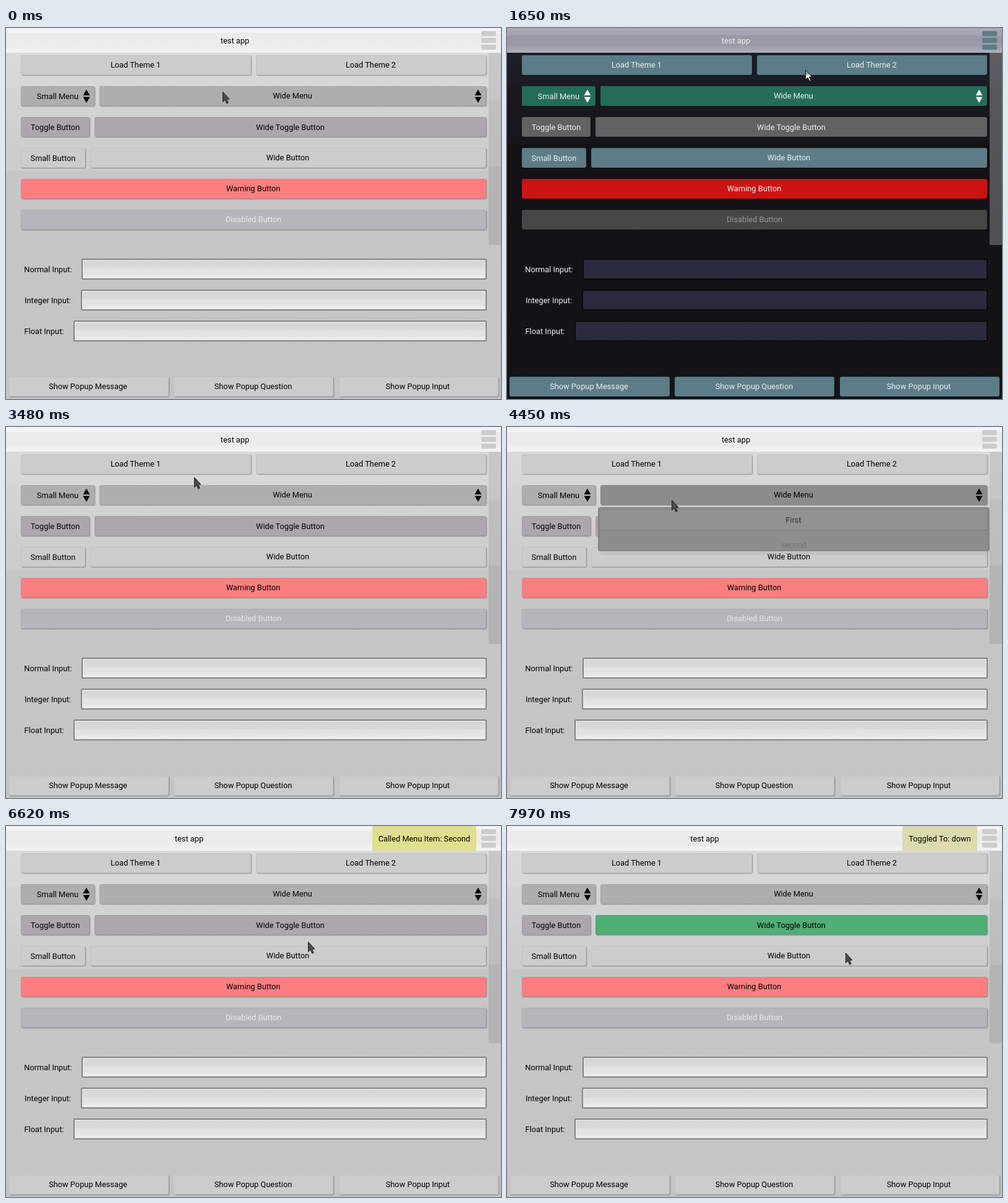
Recreate the animation shown at these times as an HTML page. Size 800 px wide and 600 px high, loop 8 s.

```html
<!DOCTYPE html>
<html lang="en">
<head>
<meta charset="utf-8">
<title>test app</title>
<style>
html, body { margin: 0; width: 100%; height: 100%; overflow: hidden; background: #c5c5c5; }
svg { display: block; width: 800px; height: 600px; }
text { font: 12.8px Roboto, sans-serif; text-anchor: middle; }
</style>
</head>
<body>
<svg id="stage" viewBox="0 0 800 600" xmlns="http://www.w3.org/2000/svg"></svg>
<script>
const NS = 'http://www.w3.org/2000/svg';
const LOOP = 8000;
const stage = document.getElementById('stage');

function add(parent, tag, attrs, text) {
  const el = document.createElementNS(NS, tag);
  set(el, attrs);
  if (text) el.textContent = text;
  parent.appendChild(el);
  return el;
}
function set(el, attrs) {
  for (const k in attrs) el.setAttribute(k, attrs[k]);
}
function box(parent, x, y, w, h, fill, r = 0, extra = {}) {
  return add(parent, 'rect', { x, y, width: w, height: h, rx: r, fill, ...extra });
}
const group = (parent = stage) => add(parent, 'g', {});
const rgb = c => `rgb(${c.map(v => Math.round(v)).join(',')})`;
const gray = v => [v, v, v];
const ramp = (t, a, b) => Math.min(1, Math.max(0, (t - a) / (b - a)));

// Piecewise linear value through [time, vector] keys
function track(keys, t) {
  if (t <= keys[0][0]) return keys[0][1];
  for (let i = 1; i < keys.length; i++) {
    const [t1, b] = keys[i], [t0, a] = keys[i - 1];
    if (t < t1) return a.map((v, j) => v + (b[j] - v) * (t - t0) / (t1 - t0));
  }
  return keys[keys.length - 1][1];
}

function vertical(id, y1, y2, stops) {
  const g = add(defs, 'linearGradient', { id, gradientUnits: 'userSpaceOnUse', x1: 0, x2: 0, y1, y2 });
  for (const [y, c] of stops) {
    add(g, 'stop', { offset: (y - y1) / (y2 - y1), 'stop-color': c });
  }
  return `url(#${id})`;
}

const defs = add(stage, 'defs', {});

// Backgrounds of both themes, switched at once
const lightBg = group(), darkBg = group();
box(lightBg, 0, 0, 800, 600, vertical('lb', 40, 600, [
  [40, '#dadada'], [97, '#d7d7d7'], [97, '#d4d4d4'], [163, '#d1d1d1'],
  [163, '#cfcfcf'], [231, '#cccccc'], [231, '#c6c6c6'], [600, '#c4c4c4']]));
box(lightBg, 0, 0, 800, 40, vertical('lt', 0, 40, [
  [0, '#f4f4f4'], [8, '#f3f3f3'], [8, '#ebebeb'], [30, '#ececec'], [34, '#f1f1f1'], [40, '#f3f3f3']]));
box(lightBg, 780, 40, 20, 311, vertical('ls', 40, 351, [
  [40, '#c8c8c8'], [117, '#c5c5c5'], [117, '#bfbfbf'], [224, '#bcbcbc'], [224, '#b4b4b4'], [351, '#b3b3b3']]));

box(darkBg, 0, 0, 800, 600, vertical('db', 40, 600, [
  [40, '#1f1f29'], [95, '#1b1b24'], [95, '#18181f'], [187, '#15151b'], [187, '#121216'], [600, '#141417']]));
box(darkBg, 0, 0, 800, 40, vertical('dt', 0, 40, [
  [0, '#aba9b6'], [11, '#a6a4b0'], [13, '#9a98a5'], [28, '#9b99a6'], [40, '#b2b0bc']]));
box(darkBg, 780, 40, 20, 311, vertical('ds', 40, 351, [[40, '#5e5e63'], [120, '#57575a'], [351, '#505052']]));

// Labels and text inputs
const labels = [];
[['Normal Input:', 68, 122, 373], ['Integer Input:', 67.5, 121, 423], ['Float Input:', 61.5, 109, 473]]
  .forEach(([name, cx, x, y], i) => {
    const w = 777 - x;
    box(lightBg, x + 1, y + 1, w - 2, 32, vertical('li' + i, y, y + 34, [
      [y, '#d3d3d3'], [y + 16, '#dbdbdb'], [y + 16, '#e2e2e2'], [y + 26, '#e4e4e4'], [y + 29, '#eeeeee'], [y + 34, '#ececec']]),
      1, { stroke: '#848484', 'stroke-width': 2 });
    box(lightBg, x + 3, y + 3, w - 6, 28, 'none', 1, { stroke: '#e6e6e6', 'stroke-width': 2, 'stroke-opacity': .75 });
    box(darkBg, x + 1, y + 1, w - 2, 32, vertical('di' + i, y, y + 34, [
      [y, '#272739'], [y + 10, '#2c2c41'], [y + 34, '#2a2a3d']]),
      1, { stroke: '#0a0a0e', 'stroke-width': 2 });
    labels.push(add(stage, 'text', { x: cx, y: y + 22 }, name));
  });

// Theme timing: fades between light and dark
const themed = (light, dark) => [[1390, light], [1630, dark], [2660, dark], [2900, light]];
const plain = [gray(204), [92, 125, 135]];
const menu = [gray(174), [36, 109, 89]];
const toggle = [[173, 166, 172], gray(98)];
const textKeys = themed(gray(0), gray(238));
const fadeText = [];
const fills = [];

function arrows(parent, x) {
  fadeText.push(add(parent, 'path', {
    d: `M${x} 99.5l5.5 9.5h-11zM${x} 121l5.5-9.5h-11z`
  }));
}

function button(name, x, y, w, [light, dark], opts = {}) {
  const g = group();
  box(g, x + .5, y + .5, w + 1.5, 33.5, '#000', 4, { opacity: .1 });
  box(g, x + .5, y + .5, w + .5, 32.5, '#000', 3.5, { opacity: .16 });
  const face = box(g, x, y, w, 32, '#ccc', 3);
  box(g, x + .5, y + .5, w - 1, 31, 'none', 3, { stroke: '#000', 'stroke-opacity': .05 });
  const label = add(g, 'text', { x: x + w / 2 - (opts.shift ?? .5), y: y + (opts.low ? 21 : 20) }, name);
  fills.push([face, opts.keys || themed(light, dark)]);
  if (opts.text) fills.push([label, opts.text]);
  else fadeText.push(label);
  return g;
}

const [L, D] = plain;
const held = [155, 156, 163];
button('Load Theme 1', 24, 44, 372, plain, {
  keys: [[1390, L], [1630, D], [2530, D], [2640, held], [2660, held], [2900, L]]
});
button('Load Theme 2', 404, 44, 372, plain, {
  keys: [[1180, L], [1300, gray(163)], [1390, gray(163)], [1630, D], [2660, D], [2900, L]]
});
arrows(button('Small Menu', 24, 94, 119, menu, { low: 1, shift: 0 }), 130);
const open = [139, 140, 139];
arrows(button('Wide Menu', 151, 94, 625, menu, {
  keys: [...themed(...menu), [4110, menu[0]], [4250, open], [5700, open], [5800, [170, 171, 170]], [5900, menu[0]]]
}), 763);
button('Toggle Button', 24, 144, 111, toggle, { low: 1, shift: 0 });
button('Wide Toggle Button', 143, 144, 633, toggle, {
  low: 1, shift: 0,
  keys: [...themed(...toggle), [6800, toggle[0]], [6900, [150, 146, 150]], [7280, [80, 174, 119]]]
});
button('Small Button', 24, 194, 104, plain, { low: 1, shift: 0 });
button('Wide Button', 136, 194, 640, plain);
button('Warning Button', 24, 244, 752, [[255, 127, 128], [204, 20, 20]]);
button('Disabled Button', 24, 294, 752, [[180, 182, 188], gray(71)], {
  shift: 0, text: themed(gray(232), gray(150))
});
button('Show Popup Message', 4, 564, 259, plain, { shift: 1 });
button('Show Popup Question', 271, 564, 258, plain);
button('Show Popup Input', 538, 564, 258, plain, { shift: 1.5 });

for (const y of [5, 16, 27]) {
  fills.push([box(stage, 768, y, 24, 8, '#ccc', 2), themed(...plain)]);
}

const title = add(stage, 'text', { y: 25 }, 'test app');
const note = group();
const noteBox = box(note, 592, 0, 168, 40, '#fff');
const noteText = add(note, 'text', { y: 25 });

// Drop-down list
const drop = group();
const dropBox = box(drop, 148, 130.5, 631, 159, rgb(open), 3, {
  stroke: '#777a77', 'stroke-opacity': .75, 'stroke-width': 2
});
const items = ['First', 'Second', 'Third', 'Fourth'].map((name, i) => {
  const g = group(drop), y = 134 + 40 * i;
  box(g, 151, y + 1, 626, 33, '#000', 3, { opacity: .12 });
  const face = box(g, 151, y, 625, 32, '#959695', 3);
  add(g, 'text', { x: 463, y: y + 21 }, name);
  return { g, face };
});

const cursor = group();
const arrow = 'M.5.5V16.5L4 13L6.8 19L9.2 18L6.6 12H11Z';
const pointer = add(cursor, 'path', { d: arrow, 'stroke-linejoin': 'round' });
vertical('tip', 0, 19, [[0, '#8d857c'], [8, '#b4aca4'], [10, '#f0eeec'], [19, '#ffffff']]);

const path = [
  [370, [350, 103]], [470, [368, 101]], [650, [430, 84]], [800, [474, 70]], [890, [482, 67]],
  [1800, [482, 67]], [1920, [455, 65]], [2120, [360, 60]], [2280, [327, 57]],
  [3260, [327, 57]], [3380, [342, 68]], [3520, [290, 86]], [3700, [185, 108]], [3790, [149, 114]],
  [3900, [190, 117]], [4060, [266, 118]],
  [4660, [266, 118]], [4780, [275, 142]], [4910, [286, 171]],
  [4960, [286, 171]], [5160, [295, 211]], [5250, [298, 210]], [5370, [299, 196]],
  [6370, [299, 196]], [6450, [345, 197]], [6620, [488, 187]], [6720, [515, 174]], [6800, [522, 168]],
  [7350, [522, 168]], [7550, [528, 176]], [7800, [541, 196]], [7970, [547, 205]]
];
const noteColor = [
  [0, [240, 240, 232]], [90, [241, 239, 190]], [350, [230, 229, 134]],
  [920, [224, 223, 140]], [1070, [219, 219, 173]], [1300, [207, 207, 204]]
];
const notes = [
  { from: 5700, text: 'Called Menu Item: Second', w: 168 },
  { from: 6900, text: 'Toggled To: down', w: 121 }
];
const show = (el, on) => set(el, { visibility: on ? 'visible' : 'hidden' });

function drawNote(t) {
  const n = notes.filter(v => t >= v.from).pop();
  show(note, n);
  set(title, { x: (760 - (n ? n.w : 20)) / 2 });
  if (!n) return;
  set(noteBox, { x: 760 - n.w, width: n.w, fill: rgb(track(noteColor, t - n.from)) });
  set(noteText, { x: 760 - n.w / 2 });
  if (noteText.textContent !== n.text) noteText.textContent = n.text;
}

function drawDrop(t) {
  const start = 4250;
  drop.style.display = t > start && t < 6000 ? '' : 'none';
  set(drop, { opacity: 1 - ramp(t, 5700, 6000) });
  set(dropBox, { height: 159 * ramp(t, start, 4710) });
  items.forEach(({ g, face }, i) => {
    const from = start + 140 * i;
    set(g, { opacity: ramp(t, from, from + 320) });
    const v = i === 1 ? 149 - 27 * ramp(t, 5550, 5650) : 149;
    set(face, { fill: rgb([v, v + 1, v]) });
  });
}

function draw(t) {
  const dark = t >= 1390 && t < 2660;
  show(lightBg, !dark);
  show(darkBg, dark);
  for (const el of [title, ...labels]) set(el, { fill: dark ? '#eee' : '#000' });
  const ink = rgb(track(textKeys, t));
  for (const el of fadeText) set(el, { fill: ink });
  for (const [el, keys] of fills) set(el, { fill: rgb(track(keys, t)) });
  drawNote(t);
  drawDrop(t);
  const [x, y] = track(path, t);
  set(cursor, { transform: `translate(${Math.round(x)} ${Math.round(y)})` });
  set(pointer, { fill: dark ? 'url(#tip)' : '#4c4c4c', stroke: dark ? '#111' : '#1e1e1e' });
}

const began = performance.now();
function tick() {
  draw((performance.now() - began) % LOOP);
  requestAnimationFrame(tick);
}
draw(0);
requestAnimationFrame(tick);
</script>
</body>
</html>
```
